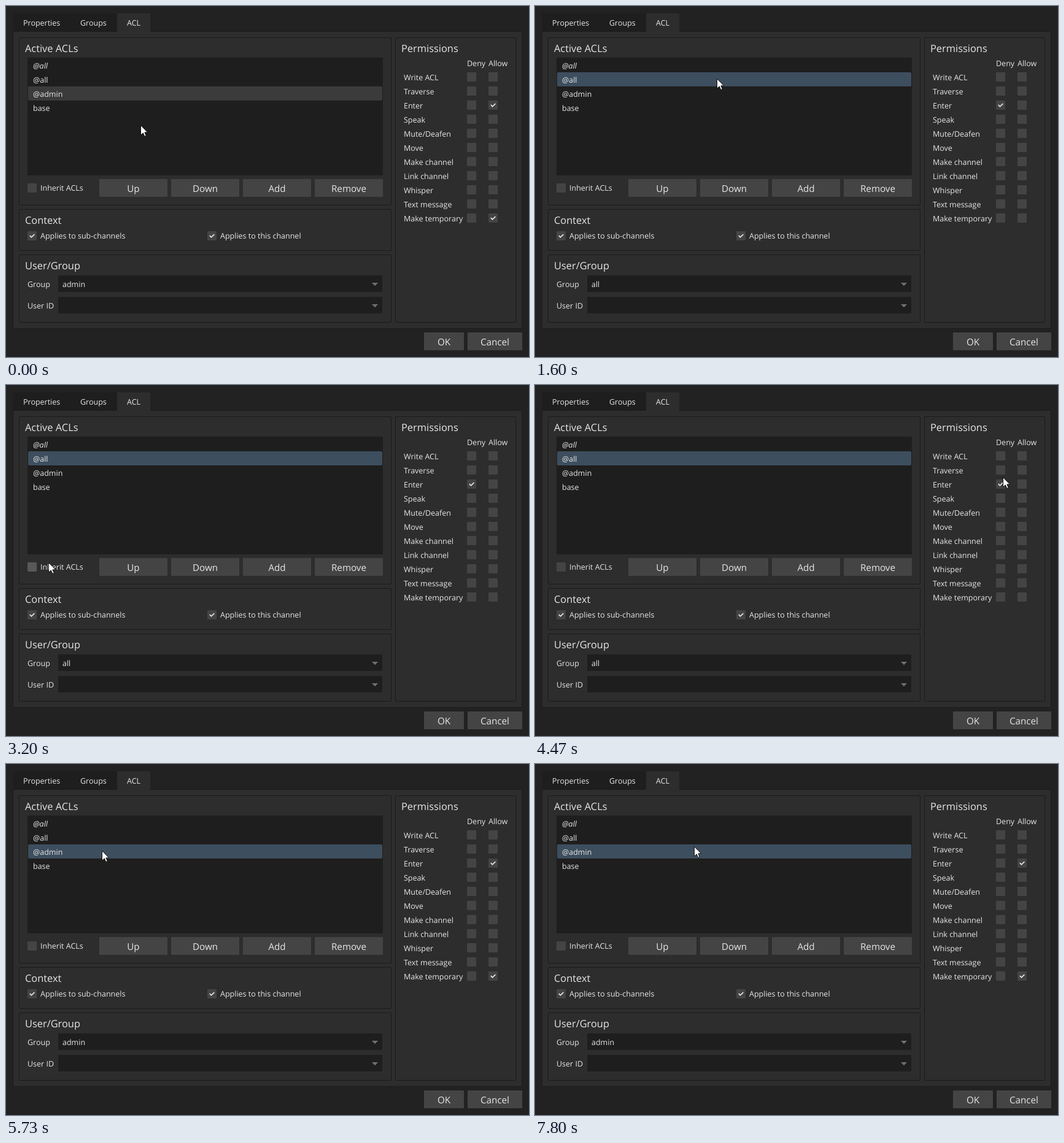
These frames come from a looping animation (852 px wide and 572 px high, 8000 ms). An HTML page:

```html
<!DOCTYPE html>
<html lang="en">
<head>
<meta charset="utf-8">
<title>ACL editor</title>
<style>
  html, body { margin: 0; width: 100%; height: 100%; overflow: hidden; background: #222; }
  svg { display: block; }
  text { font: 12.5px "Open Sans", "Noto Sans", sans-serif; fill: #e6e6e6; white-space: pre; text-rendering: geometricPrecision; }
  .head { font-size: 16.4px; }
  .btn { font-size: 15.2px; text-anchor: middle; }
  .it { font-style: italic; }
</style>
</head>
<body>
<svg id="stage" width="852" height="572" viewBox="0 0 852 572"></svg>
<script>
const LOOP = 8000, TICK = 200 / 3, ROW = 23;
const stage = document.getElementById('stage');

function add(tag, attrs, content) {
  const el = document.createElementNS('http://www.w3.org/2000/svg', tag);
  for (const name in attrs) el.setAttribute(name, attrs[name]);
  if (content) el.textContent = content;
  stage.appendChild(el);
  return el;
}
const rect = (x, y, width, height, fill, rx = 1) => add('rect', { x, y, width, height, fill, rx });
const text = (x, y, str, cls = '') => add('text', { x, y, class: cls }, str);
const frame = (x, y, w, h) =>
  add('rect', { x: x + .5, y: y + .5, width: w - 1, height: h - 1, rx: 1.5, fill: '#2d2d2d', stroke: '#1b1b1b' });

function panel(x, y, w, h, title) {
  frame(x, y, w, h);
  text(x + 10, y + 24, title, 'head');
}

const hovers = [];
function hoverable(x, y, w, h, lit, hitWidth = w) {
  hovers.push({ el: rect(x, y, w, h, '#444'), x, y, w: hitWidth, h, lit });
}

function checkbox(x, y, hitWidth) {
  hoverable(x, y, 15, 15, '#585858', hitWidth);
  return add('path', {
    d: `M${x + 3.8} ${y + 7.2}l2.6 2.6 5-4.7`, fill: 'none', stroke: '#e6e6e6', 'stroke-width': 1.7
  });
}

function labelledBox(x, y, label, hitWidth) {
  text(x + 21, y + 12, label);
  return checkbox(x, y, hitWidth);
}

function button(x, y, w, label) {
  hoverable(x, y, w, 29, '#505050');
  text(x + w / 2, y + 21, label, 'btn');
}

function combo(y, label) {
  text(35, y + 19, label);
  rect(85, y, 528, 27, '#1e1e1e');
  add('path', { d: `M596 ${y + 12}h10l-5 5.3z`, fill: '#707070' });
  return text(92, y + 19, '');
}

const show = (el, on) => { el.style.display = on ? '' : 'none'; };

// Tabs and panels
rect(12, 12, 169, 30, '#1e1e1e');
frame(11, 41, 830, 485);
rect(181, 12, 54, 31, '#2d2d2d');
text(28, 32, 'Properties');
text(121, 32, 'Groups');
text(197, 32, 'ACL');
panel(21, 51, 607, 274, 'Active ACLs');
panel(21, 331, 607, 68, 'Context');
panel(21, 405, 607, 111, 'User/Group');
panel(634, 51, 197, 465, 'Permissions');

// ACL list
rect(35, 84, 579, 192, '#1e1e1e');
const rows = ['@all', '@all', '@admin', 'base'].map((label, i) => {
  const y = 85 + i * ROW;
  const el = rect(36, y, 577, ROW, 'none', 2);
  text(44, y + 17, label, i ? '' : 'it');
  return { el, x: 36, y, w: 577, h: ROW };
});
show(labelledBox(35, 289, 'Inherit ACLs', 90), false);
['Up', 'Down', 'Add', 'Remove'].forEach((label, i) => button(152 + i * 117, 282, 111, label));

// Context and group
labelledBox(35, 367, 'Applies to sub-channels', 161);
labelledBox(328, 367, 'Applies to this channel', 153);
const group = combo(439, 'Group');
combo(474, 'User ID');

// Permissions
text(751, 98, 'Deny');
text(786, 98, 'Allow');
const permissions = ['Write ACL', 'Traverse', 'Enter', 'Speak', 'Mute/Deafen', 'Move',
  'Make channel', 'Link channel', 'Whisper', 'Text message', 'Make temporary'].map((label, i) => {
  const y = 108 + i * ROW;
  text(648, y + 13, label);
  return { label, deny: checkbox(751, y), allow: checkbox(786, y) };
});

button(681, 532, 65, 'OK');
button(752, 532, 89, 'Cancel');

const pointer = add('path', {
  d: 'M.5 .5V16.5L4.3 12.9 6.8 18.5 9.3 17.4 6.9 11.9H11.6Z', fill: '#fff', stroke: '#111'
});

// Each move eases to a point, optionally along a curve bowed sideways
const origin = { x: 219, y: 194 };
const moves = [
  { from: 0, to: 14, x: 103, y: 119 },
  { from: 19, to: 24, x: 296, y: 118 },
  { from: 24, to: 27, x: 290, y: 111 },
  { from: 29, to: 41, x: 57, y: 291, bowX: -80, bowY: 80 },
  { from: 47, to: 60, x: 767, y: 145 },
  { from: 66, to: 67, x: 762, y: 150 },
  { from: 70, to: 83, x: 156, y: 141, bowY: 55 },
  { from: 87, to: 95, x: 769, y: 158 },
  { from: 96, to: 101, x: 755, y: 304, bowX: 27 },
  { from: 101, to: 105, x: 739, y: 341 },
  { from: 108, to: 117, x: 259, y: 134 }
];

function pointerAt(tick) {
  let { x, y } = origin;
  for (const m of moves) {
    if (tick <= m.from) break;
    const u = Math.min(1, (tick - m.from) / (m.to - m.from));
    const s = u * u * (3 - 2 * u), arc = 4 * s * (1 - s);
    x += (m.x - x) * s + (m.bowX || 0) * arc;
    y += (m.y - y) * s + (m.bowY || 0) * arc;
  }
  return { x: Math.round(x), y: Math.round(y) };
}

const inside = (p, box) =>
  p.x >= box.x && p.x < box.x + box.w && p.y >= box.y && p.y < box.y + box.h;

function render(ms) {
  const tick = Math.floor((Math.floor(ms / 10) * 10 + 5) / TICK);
  const p = pointerAt(tick);
  const focused = tick >= 17;
  const admin = !focused || tick >= 84;
  const selected = rows[admin ? 2 : 1];

  pointer.setAttribute('transform', `translate(${p.x} ${p.y})`);
  for (const row of rows) {
    const fill = row === selected ? (focused ? '#3d4e5e' : '#3b3b3b') : inside(p, row) ? '#2e2e2e' : 'none';
    row.el.setAttribute('fill', fill);
  }
  for (const h of hovers) h.el.setAttribute('fill', inside(p, h) ? h.lit : '#444');
  for (const { label, deny, allow } of permissions) {
    show(deny, !admin && label === 'Enter');
    show(allow, admin && (label === 'Enter' || label === 'Make temporary'));
  }
  group.textContent = admin ? 'admin' : 'all';
}

const start = performance.now();
function loop() {
  render((performance.now() - start) % LOOP);
  requestAnimationFrame(loop);
}
loop();
</script>
</body>
</html>
```
